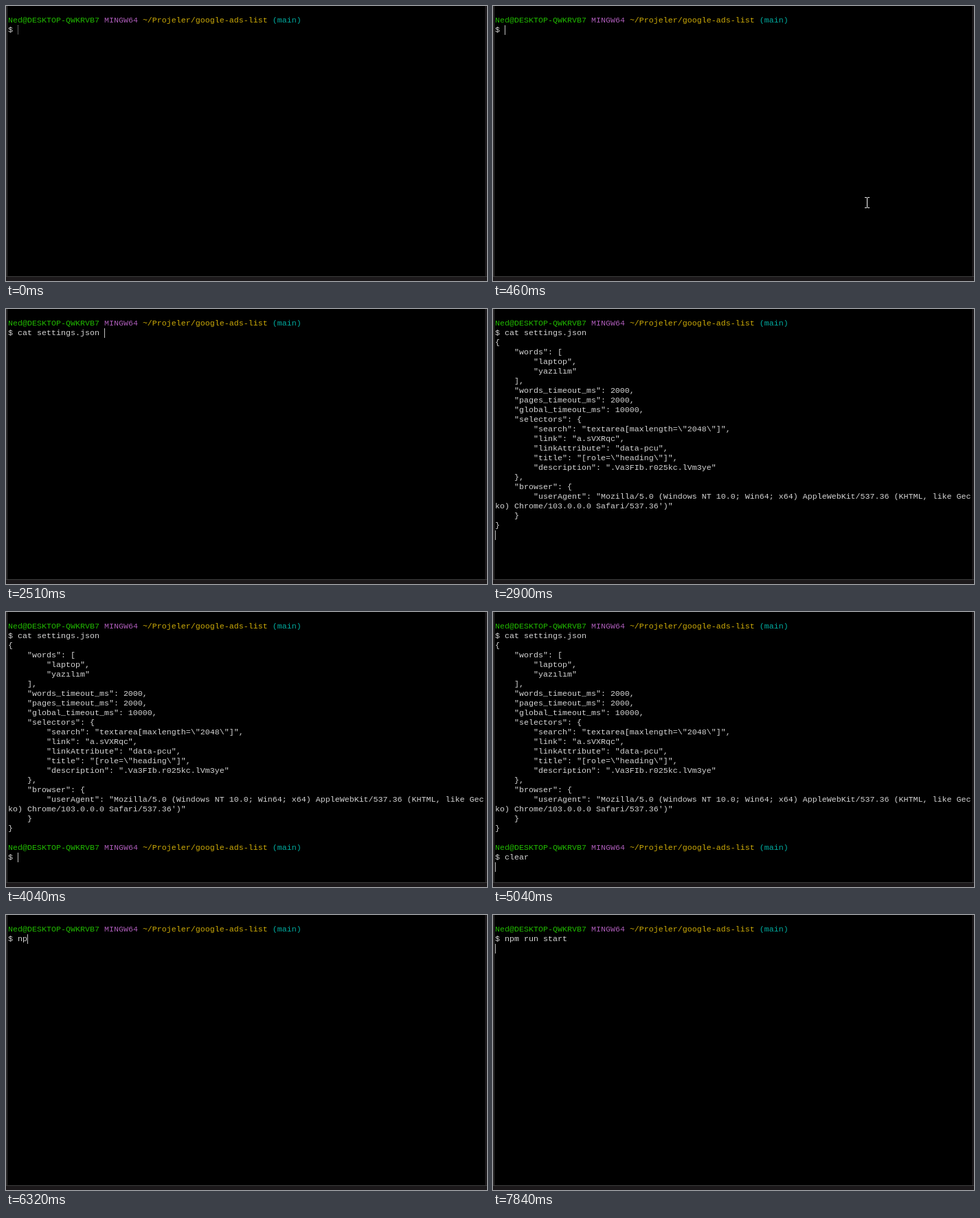
Animation of 700x400 px, one loop 8000 ms. Source, as an HTML page:

```html
<!DOCTYPE html>
<html lang="en">
<head>
<meta charset="utf-8">
<title>Terminal session</title>
<style>
html, body { margin: 0; width: 100%; height: 100%; overflow: hidden; background: #000; }
#stage { position: relative; width: 700px; height: 400px; overflow: hidden; background: #000; }
#stage > * { position: absolute; }
#left { left: 0; top: 0; width: 1px; height: 394px; background: #1c191b; border-right: 1px solid #3c3c3c; }
#right { left: 697px; top: 0; width: 3px; height: 394px; background: #1c191b; }
#bottom { left: 0; top: 393px; width: 700px; height: 6px; background: #1c191b; border-top: 1px solid #3c3c3c; }
#text { left: 3px; top: 0; margin: 0; color: #d4d4d4; white-space: pre;
  font: 11.665px/14px "Liberation Mono", monospace; }
#caret { width: 1px; height: 14px; background: #bfbfbf; }
#caret.dotted { background: repeating-linear-gradient(#bfbfbf 0 1px, #000 1px 2px); }
#mouse { left: 0; top: 0; width: 700px; height: 400px; }
.user { color: #20b800; }
.sys { color: #ac5cb8; }
.path { color: #ccaa08; }
.branch { color: #00aca0; }
</style>
</head>
<body>
<div id="stage">
  <pre id="text"></pre>
  <div id="caret"></div>
  <div id="left"></div>
  <div id="right"></div>
  <div id="bottom"></div>
  <svg id="mouse">
    <path id="arrow" d="M0 0V16.5L4 13L6.5 18.5L9 17.5L6.5 12H11.5Z" fill="#fff"/>
    <path id="beam" d="M0 .5H3M4 .5H7M3.5 1V15M0 15.5H3M4 15.5H7" transform="translate(541 278)" stroke="#fff" fill="none"/>
  </svg>
</div>
<script>
const LOOP = 8000, CELL_W = 7, CELL_H = 14;
const el = id => document.getElementById(id);
const span = (cls, s) => `<span class="${cls}">${s}</span>`;

const prompt = "\n" + [
  span("user", "Ned@DESKTOP-QWKRVB7"),
  span("sys", "MINGW64"),
  span("path", "~/Projeler/google-ads-list"),
  span("branch", "(main)")
].join(" ") + "\n$ ";

const settings = String.raw`{
    "words": [
        "laptop",
        "yazılım"
    ],
    "words_timeout_ms": 2000,
    "pages_timeout_ms": 2000,
    "global_timeout_ms": 10000,
    "selectors": {
        "search": "textarea[maxlength=\"2048\"]",
        "link": "a.sVXRqc",
        "linkAttribute": "data-pcu",
        "title": "[role=\"heading\"]",
        "description": ".Va3FIb.r025kc.lVm3ye"
    },
    "browser": {
        "userAgent": "Mozilla/5.0 (Windows NT 10.0; Win64; x64) AppleWebKit/537.36 (KHTML, like Gec
ko) Chrome/103.0.0.0 Safari/537.36')"
    }
}
`;

// Screen states: start time, text, caret style. The caret follows the text.
const states = [];
const show = (time, text, caret = "solid") => states.push({ time, text, caret });
const type = (base, command, times) =>
  times.forEach((time, i) => show(time, base + command.slice(0, i + 1)));

show(0, prompt, "dotted");
show(430, prompt);
type(prompt, "cat settin", [690, 820, 1100, 1200, 1300, 1530, 1560, 1840, 2070, 2300]);
const cat = prompt + "cat settings.json ";
show(2510, cat);
show(2870, cat + "\n");
show(2900, cat + "\n" + settings);
const printed = cat + "\n" + settings + prompt;
show(3000, printed);
show(3510, printed, "off");
show(4040, printed);
type(printed, "clear", [4110, 4210, 4310, 4520, 4680]);
show(5040, printed + "clear\n");
show(5070, "");
show(5170, prompt);
show(5680, prompt, "off");
show(6110, prompt);
type(prompt, "npm run start",
  [6140, 6320, 6550, 6650, 6750, 6860, 7030, 7130, 7230, 7390, 7460, 7540, 7710]);
show(7840, prompt + "npm run start\n");

let current;
function drawScreen(t) {
  const state = states.findLast(s => s.time <= t);
  if (state === current) return;
  current = state;
  // A line break right after <pre> content starts is kept when set through innerHTML.
  el("text").innerHTML = state.text;
  const lines = state.text.replace(/<[^>]+>/g, "").split("\n");
  const caret = el("caret");
  caret.className = state.caret;
  caret.hidden = state.caret === "off";
  caret.style.left = 3 + lines.at(-1).length * CELL_W + "px";
  caret.style.top = (lines.length - 1) * CELL_H + "px";
}

function drawMouse(t) {
  const p = Math.min(3, Math.floor((t - 130) / 30)) / 3;
  const x = Math.round(630 - 89 * p), y = Math.round(363 - 85 * p);
  el("arrow").setAttribute("transform", `translate(${x} ${y})`);
  el("arrow").style.display = t >= 130 && t < 460 ? "" : "none";
  el("beam").style.display = t >= 460 && t < 690 ? "" : "none";
}

const start = performance.now();
function frame() {
  const t = (performance.now() - start) % LOOP;
  drawScreen(t);
  drawMouse(t);
  requestAnimationFrame(frame);
}
frame();
</script>
</body>
</html>
```
